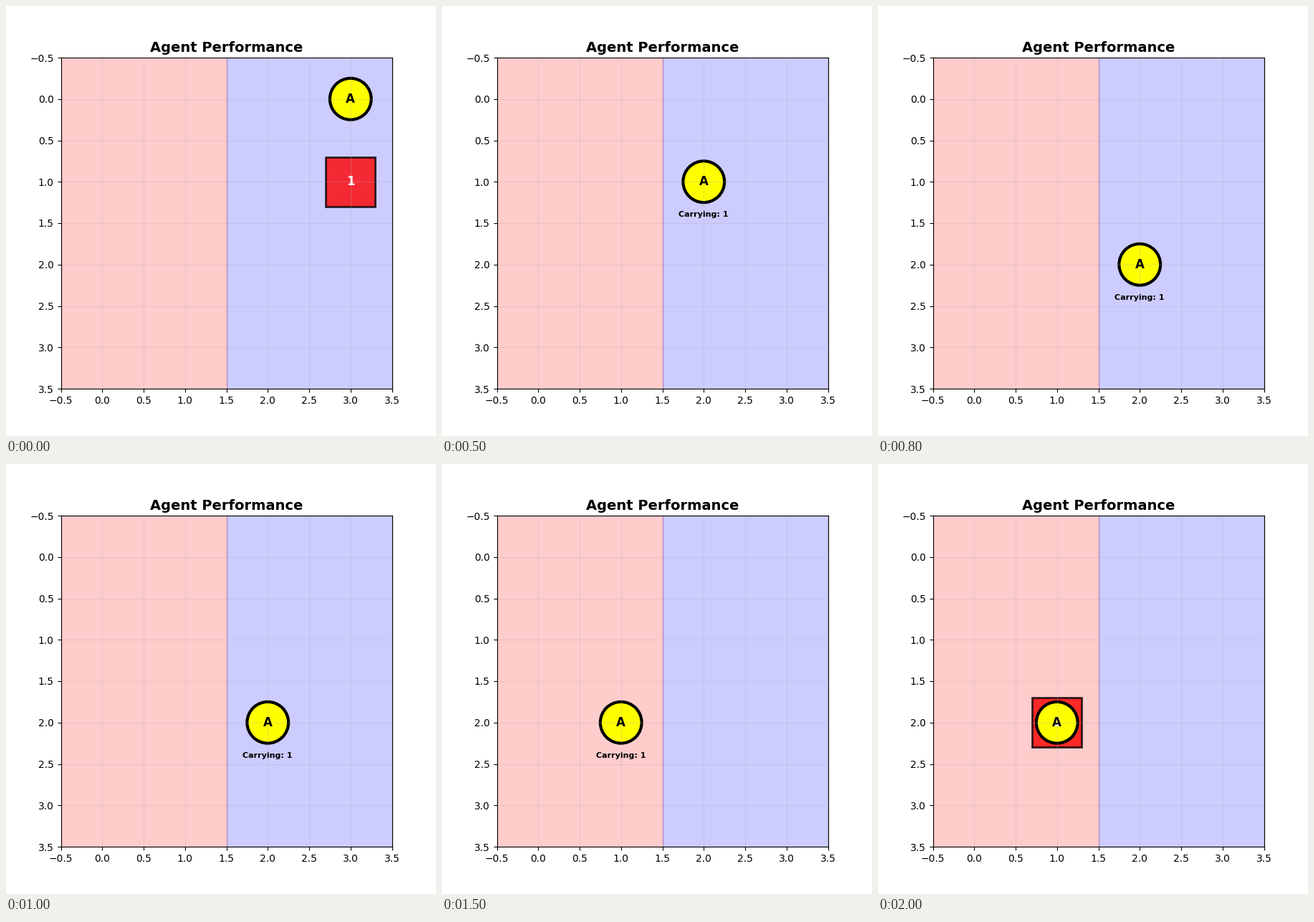
These frames come from a looping animation (600 by 600 pixels, 2100 ms). A matplotlib script:

```python
import matplotlib.pyplot as plt
from matplotlib.animation import FuncAnimation
from matplotlib.patches import Circle, Rectangle

plt.rcParams["font.family"] = "DejaVu Sans"

# Moves: D/U/L/R step one cell, P picks the block up, O puts it down
ACTIONS = "DPLLRLRDRLRLOPLRLRLO"
STEP = {"D": (0, 1), "U": (0, -1), "L": (-1, 0), "R": (1, 0)}
START = (3, 0)
BLOCK = (3, 1)
SIDE = 0.6


def state_at(n):
    """Agent cell, block cell and carrying flag after n actions."""
    (x, y), block, carrying = START, BLOCK, False
    for action in ACTIONS[:n]:
        if action == "P":
            carrying = True
        elif action == "O":
            carrying, block = False, (x, y)
        else:
            dx, dy = STEP[action]
            x, y = x + dx, y + dy
    return (x, y), block, carrying


fig, ax = plt.subplots(figsize=(6, 6), dpi=100)
ax.set_xlim(-0.5, 3.5)
ax.set_ylim(3.5, -0.5)
ax.set_aspect("equal")
ax.axvspan(-0.5, 1.5, alpha=0.2, color="red")
ax.axvspan(1.5, 3.5, alpha=0.2, color="blue")
ax.grid(True, alpha=0.3)
ax.set_title("Agent Performance", fontsize=14, fontweight="bold")


def label(text, size, color="black"):
    return ax.text(0, 0, text, ha="center", va="center", fontsize=size,
                   fontweight="bold", color=color)


box = ax.add_patch(Rectangle((0, 0), SIDE, SIDE, facecolor="red",
                             edgecolor="black", linewidth=2, alpha=0.8))
disc = ax.add_patch(Circle((0, 0), 0.25, facecolor="yellow",
                           edgecolor="black", linewidth=3))
box_label = label("1", 12, "white")
disc_label = label("A", 12)
load_label = label("Carrying: 1", 8)


def update(n):
    (x, y), (bx, by), carrying = state_at(n)
    disc.center = (x, y)
    disc_label.set_position((x, y))
    load_label.set_position((x, y + 0.4))
    load_label.set_visible(carrying)
    box.set_xy((bx - SIDE / 2, by - SIDE / 2))
    box_label.set_position((bx, by))
    box.set_visible(not carrying)
    box_label.set_visible(not carrying)
    return box, disc, box_label, disc_label, load_label


anim = FuncAnimation(fig, update, frames=len(ACTIONS) + 1, interval=100,
                     repeat=True, repeat_delay=0)
plt.show()
```
